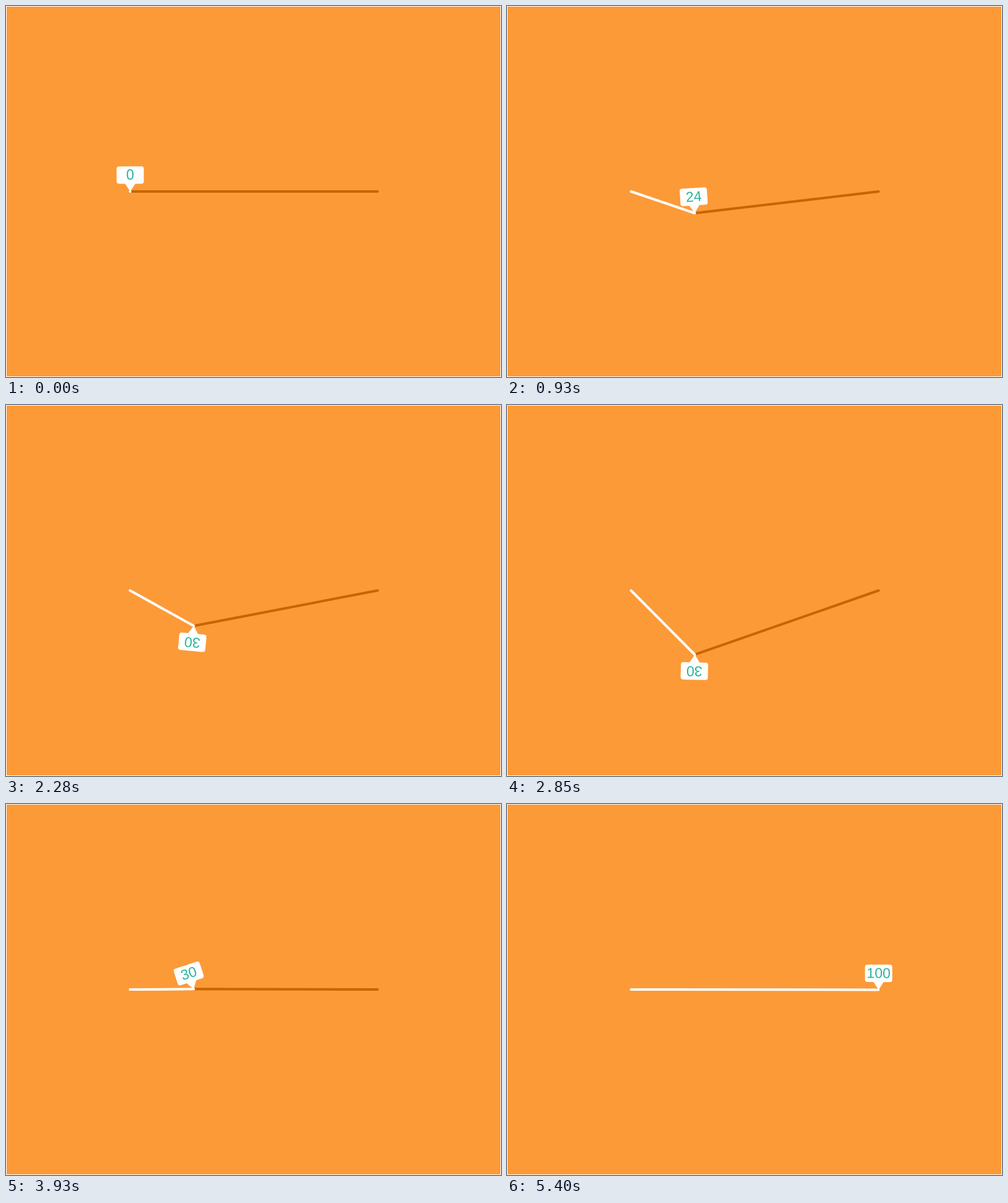
An HTML page that plays this animation: 800 px wide and 600 px high, repeating every 5.43 s.

```html
<!DOCTYPE html>
<html lang="en">
<head>
<meta charset="utf-8">
<title>Progress line</title>
<style>
  html, body { margin: 0; width: 100%; height: 100%; overflow: hidden; background: #fff; }
  svg { display: block; width: 800px; height: 600px; }
  line { stroke-width: 4; stroke-linecap: round; }
  text { font: 23px "Liberation Sans", Arial, sans-serif; fill: #2fb39a; text-anchor: middle; }
</style>
</head>
<body>
<svg viewBox="0 0 800 600">
  <rect x="1" y="1" width="798" height="598" fill="#fc9a38"/>
  <line id="rest" x2="600.5" y2="300" stroke="#c96400"/>
  <line id="done" x1="200.5" y1="300" stroke="#fff"/>
  <g id="bubble">
    <rect x="-22" y="-40.7" width="44" height="28.2" rx="4" fill="#fff"/>
    <path d="M-8.5-13h17L0 0z" fill="#fff"/>
    <text id="label" y="-19">0</text>
  </g>
</svg>
<script>
const LOOP = 5430, LEFT = 200.5, STUCK = 303.5, RIGHT = 600.5;
const [rest, done, bubble, label] =
  ["rest", "done", "bubble", "label"].map(id => document.getElementById(id));

// Progress 0..1 between two times
const span = (t, a, b) => Math.min(1, Math.max(0, (t - a) / (b - a)));
const mix = (a, b, u) => a + (b - a) * u;
const quadOut = u => 1 - (1 - u) ** 2;
const inOut = (u, p) => u < .5 ? (2 * u) ** p / 2 : 1 - (2 - 2 * u) ** p / 2;
// Decaying swing that starts at 1; s in seconds
const swing = (s, decay, speed) => Math.exp(-decay * s) * Math.cos(speed * s);

const FLIP = 1110, UNFLIP = 3300, SNAP = 3360, LAND = 3820, RUN = 4050;

function tipX(t) {
  return t < RUN ? mix(LEFT, STUCK, quadOut(span(t, 0, 900)))
                 : mix(STUCK, RIGHT, inOut(span(t, RUN, 5130), 3));
}

function tipY(t) {
  if (t < FLIP) return mix(300, 335, quadOut(span(t, 0, 900)));
  if (t < SNAP) {
    const sag = 357 - 22 * swing((t - FLIP) / 1000, 3.5, 8.73);
    return mix(sag, 450, inOut(span(t, 2390, 3310), 2));
  }
  if (t < LAND) return mix(450, 300.4, inOut(span(t, SNAP, LAND), 2));
  const s = (t - LAND) / 1000;
  return 300.4 - 4.7 * Math.exp(-4 * s) * Math.sin(25 * s);
}

function tilt(t) {
  if (t < FLIP) return -8 * Math.sin(Math.PI * t / FLIP);
  if (t < UNFLIP) {
    const settle = 1 - span(t, 2850, UNFLIP);
    return 180 - 180 * swing((t - FLIP) / 1000, 2.7, 8.73) * settle;
  }
  return 180 * swing((t - UNFLIP) / 1000, 3.3, 6);
}

function percent(t) {
  return t < RUN ? mix(0, 30, quadOut(span(t, 0, 1680)))
                 : mix(30, 100, quadOut(span(t, RUN, 4890)));
}

function place(line, end, x, y) {
  line.setAttribute("x" + end, x);
  line.setAttribute("y" + end, y);
}

const start = performance.now();
function draw(now) {
  const t = Math.max(0, now - start) % LOOP;
  const x = tipX(t), y = tipY(t);
  place(rest, 1, x, y);
  place(done, 2, x, y);
  bubble.setAttribute("transform", `translate(${x} ${y}) rotate(${tilt(t)})`);
  label.textContent = Math.round(percent(t));
  requestAnimationFrame(draw);
}
draw(start);
</script>
</body>
</html>
```
